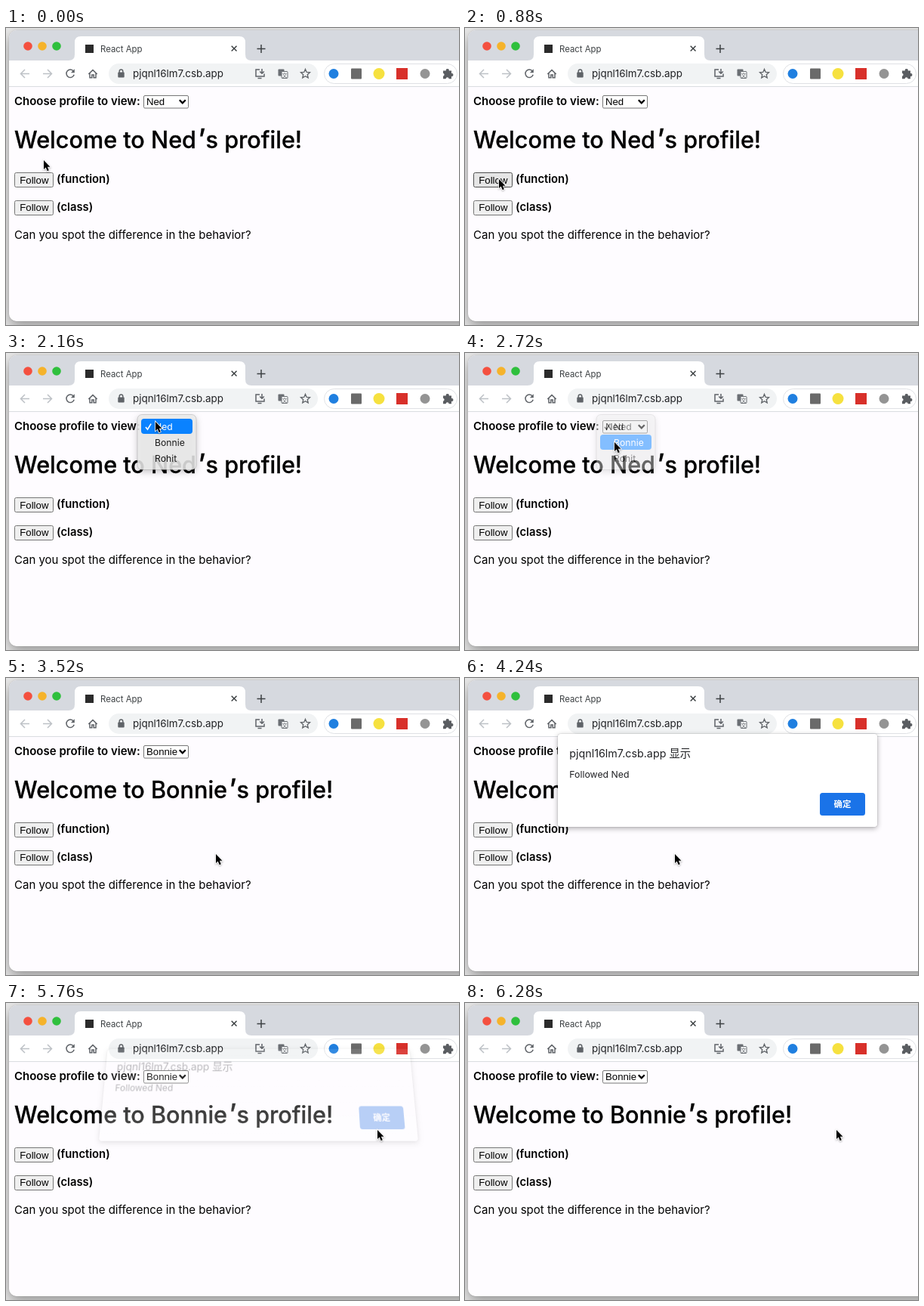
Animation of 600x393 px, one loop 6.44 s. Source, as an HTML page:

```html
<!DOCTYPE html>
<html lang="en">
<head>
<meta charset="utf-8">
<title>Profile demo</title>
<style>
  html, body { margin: 0; width: 100%; height: 100%; overflow: hidden; background: #e9e9e9; }
  #stage { position: relative; width: 600px; height: 393px; overflow: hidden; }
  svg { position: absolute; left: 0; top: 0; display: block; overflow: visible; }
  text { font-family: Inter, "Noto Sans CJK SC", "Noto Sans CJK", sans-serif; white-space: pre; }
  #win { position: absolute; left: 4px; top: 3px; width: 640px; height: 385px; border-radius: 10px;
    background: #fefcff; overflow: hidden; }
  #shade { position: absolute; left: 4px; top: 3px; width: 640px; height: 385px; border-radius: 10px;
    box-shadow: 0 0 1px rgba(0,0,0,.45), 0 7px 18px rgba(0,0,0,.36); }
  #strip { height: 40px; background: #d6d9df; }
  #bar { height: 34px; background: #fff; border-bottom: 1px solid #dadce0; }
  .form text, text.form { font-family: "Liberation Sans", Arial, sans-serif; font-size: 13.2px; }
  .line { fill: none; stroke: #5f6368; stroke-width: 1.5; }
  .dim { stroke: #bdc1c6; }
  .btn rect { fill: #efefef; stroke: #767676; }
  .btn.over rect { fill: #e5e5e5; stroke: #4f4f4f; }
  .btn.down rect { fill: #f5f5f5; stroke: #8d8d8d; }
  #menu text { font-size: 12.2px; }
  #dialog { position: absolute; left: 123px; top: 74px; width: 423px; height: 123px;
    border-radius: 4px; transform-origin: 50% 100%;
    box-shadow: 0 0 1px rgba(0,0,0,.5), 0 2px 7px rgba(0,0,0,.32); }
</style>
</head>
<body>
<div id="stage">
  <div id="shade"></div>
  <div id="win"><div id="strip"></div><div id="bar"></div></div>

  <svg width="600" height="393">
    <circle cx="29" cy="24" r="5.8" fill="#f4503f"/>
    <circle cx="48" cy="24" r="5.8" fill="#f5b32b"/>
    <circle cx="67" cy="24" r="5.8" fill="#2fc03d"/>
    <path d="M83 43q8 0 8-8V19q0-8 8-8H309q8 0 8 8V35q0 8 8 8z" fill="#fff"/>
    <rect x="105" y="22" width="11" height="11" fill="#2b2b2b"/>
    <text x="125" y="31.5" font-size="11.4" fill="#3c4043">React App</text>
    <path class="line" d="M298.7 23.7l6.8 6.8m0-6.8l-6.8 6.8" style="stroke:#3c4043"/>
    <path class="line" d="M332.5 27.5h11m-5.5-5.5v11" style="stroke:#3c4043"/>

    <path class="line dim" d="M31 60.5H19.5m5.5-5.5l-5.5 5.5 5.5 5.5"/>
    <path class="line dim" d="M49 60.5h11.5m-5.5-5.5l5.5 5.5-5.5 5.5"/>
    <path class="line" d="M89.4 57.2a5.2 5.2 0 1 0 .8 4.6"/>
    <path d="M90.8 54.3v5h-5z" fill="#5f6368"/>
    <path class="line" d="M109.3 61l5.7-5.4 5.7 5.4m-9.7-1.2v6h2.8v-3.8h2.4v3.8h2.8v-6"/>

    <rect x="136" y="47" width="277" height="27" rx="13.5" fill="#f1f3f4"/>
    <rect x="148.3" y="58.5" width="8.4" height="7" rx="1" fill="#5f6368"/>
    <path class="line" d="M150.2 59v-1.7a2.3 2.3 0 0 1 4.6 0V59"/>
    <text x="168" y="65.2" font-size="13.4" fill="#202124">pjqnl16lm7.csb.app</text>
    <path class="line" d="M336 55h-5v9h11v-3.5m-8.5 6h5M339 54v6m-2.8-2.5l2.8 2.8 2.8-2.8"/>
    <rect x="360.5" y="54.5" width="8" height="9" rx="1" fill="#6b6f74"/>
    <rect x="365" y="57.5" width="8" height="9" rx="1" fill="#f1f3f4" stroke="#6b6f74"/>
    <text x="365.8" y="65" font-size="6.6" fill="#5f6368">文</text>
    <path id="star" class="line" style="stroke-width:1.3"/>

    <rect x="421.5" y="47.5" width="176" height="26" rx="13" fill="#fff" stroke="#dfe1e5"/>
    <circle cx="434" cy="60.5" r="6.5" fill="#1f7fe0"/>
    <rect x="457" y="53.5" width="14" height="14" rx="1" fill="#6a6a6a"/>
    <circle cx="494" cy="60.5" r="7.5" fill="#f6e13f"/>
    <rect x="517" y="53" width="15" height="15" fill="#d8302a"/>
    <circle cx="555" cy="60.5" r="6.5" fill="#949494"/>
    <path d="M579 56.5h3.8a2 2 0 1 1 3.9 0h3.3v3.6a2 2 0 1 1 0 3.9v3.3h-3.4a2 2 0 0 0-4 0H579v-3.6a2 2 0 0 0 0-3.9z" fill="#5a5d61"/>

    <text x="11" y="102" font-size="15" font-weight="600">Choose profile to view:</text>
    <rect x="182.5" y="89.5" width="59" height="16.5" rx="1.5" fill="#fff" stroke="#767676"/>
    <text class="form" id="choice" x="186" y="102.2"></text>
    <path d="M229.8 95.3l4 4 4-4" fill="none" stroke="#000" stroke-width="2.3"/>
    <text x="11" y="158.5" font-size="30.6" font-weight="500" stroke="#000" stroke-width=".3"
      ><tspan id="title"></tspan><tspan dx="2.5" font-size="36">’</tspan><tspan>s profile!</tspan></text>
    <g class="btn form" id="follow">
      <rect x="11.5" y="191.5" width="51" height="19" rx="2"/><text x="18.3" y="205.5">Follow</text>
    </g>
    <text x="67" y="205.2" font-size="14.8" font-weight="600">(function)</text>
    <g class="btn form">
      <rect x="11.5" y="228.5" width="51" height="19" rx="2"/><text x="18.3" y="242.3">Follow</text>
    </g>
    <text x="67" y="242" font-size="14.8" font-weight="600">(class)</text>
    <text x="11" y="279" font-size="15">Can you spot the difference in the behavior?</text>
  </svg>

  <svg id="menu" width="600" height="393">
    <rect x="174" y="81.5" width="78" height="73" rx="6" fill="#ececec" fill-opacity=".86"
      stroke="#000" stroke-opacity=".14" style="filter:drop-shadow(0 3px 4px rgba(0,0,0,.25))"/>
    <rect id="mark" x="179" width="68" height="20" rx="4" fill="#0a82ff"/>
    <path id="tick" d="M185 98l2.5 3.2 4.6-7.6" fill="none" stroke-width="1.6"/>
    <g id="items"></g>
  </svg>

  <div id="dialog">
    <svg width="423" height="123" lang="zh-CN">
      <text x="15.3" y="30.5" font-size="14.3" fill="#202124">pjqnl16lm7.csb.app 显示</text>
      <text x="15.3" y="58" font-size="12.3" fill="#202124">Followed Ned</text>
      <rect id="ok" x="347" y="78" width="60" height="30" rx="3.5"/>
      <text x="377" y="97.2" font-size="11.4" font-weight="700" fill="#fff" text-anchor="middle">确定</text>
    </svg>
  </div>

  <svg id="cursor" width="14" height="20">
    <path d="M0 0V12L2.7 9.5 4.7 14.2 6.8 13.3 4.9 8.7H8.5z" fill="#000" stroke="#fff" stroke-width="1.6"
      paint-order="stroke" style="filter:drop-shadow(0 1px 1px rgba(0,0,0,.3))"/>
  </svg>
</div>

<script>
const LOOP = 6440, STEP = 40;
const NAMES = ["Ned", "Bonnie", "Rohit"];
const $ = id => document.getElementById(id);
const clamp = v => Math.max(0, Math.min(1, v));
const ramp = (t, a, b) => clamp((t - a) / (b - a));
const ease = p => p * p * (3 - 2 * p);

// Pointer moves: start, end, destination
const HOME = [50, 175];
const MOVES = [
  [200, 560, 45, 200],
  [1120, 1560, 198, 91],
  [2160, 2440, 198, 118],
  [2880, 3240, 278, 233],
  [4640, 4960, 483, 173],
  [5160, 5480, 492, 168]
];

function pointer(t) {
  let [x, y] = HOME;
  for (const [a, b, tx, ty] of MOVES) {
    const p = ease(ramp(t, a, b));
    x += (tx - x) * p;
    y += (ty - y) * p;
  }
  return [x, y];
}

const within = (x, y, l, t, r, b) => x >= l && x <= r && y >= t && y <= b;

const rows = NAMES.map((name, i) => {
  const el = document.createElementNS("http://www.w3.org/2000/svg", "text");
  el.setAttribute("x", 197);
  el.setAttribute("y", 101.8 + i * 21);
  el.textContent = name;
  $("items").append(el);
  return el;
});

let star = "";
for (let i = 0; i < 10; i++) {
  const a = (i / 5 - 0.5) * Math.PI, r = i % 2 ? 2.9 : 6.3;
  star += (i ? "L" : "M") + (396.5 + r * Math.cos(a)).toFixed(2) + " " + (60.8 + r * Math.sin(a)).toFixed(2);
}
$("star").setAttribute("d", star + "z");

function drawDialog(open) {
  const away = 1 - open;
  const box = $("dialog").style;
  box.opacity = open ** 0.85;
  // The top edge turns away and thins out first
  box.background = `linear-gradient(rgba(255,255,255,${open}), #fff)`;
  box.transform = away
    ? `translateY(${-19 * away}px) perspective(400px) rotateX(${13.7 * away}deg) scaleY(${1 + 0.09 * away})`
    : "none";
}

function draw(t) {
  const [x, y] = pointer(t);
  $("cursor").style.transform = `translate(${x}px, ${y}px)`;

  const over = within(x, y, 11, 191, 63, 211);
  const down = over && t >= 600 && t < 720;
  $("follow").setAttribute("class", "btn form" + (down ? " down" : over ? " over" : ""));

  const name = NAMES[t < 2760 ? 0 : 1];
  $("choice").textContent = name;
  $("title").textContent = `Welcome to ${name}`;

  $("menu").style.opacity = t < 1840 ? 0 : 1 - ramp(t, 2640, 2800);
  const row = y > 107.5 ? 1 : 0;
  $("mark").setAttribute("y", 87 + row * 21);
  rows.forEach((el, i) => el.setAttribute("fill", i === row ? "#fff" : "#1a1a1a"));
  $("tick").setAttribute("stroke", row ? "#1a1a1a" : "#fff");

  drawDialog(t < 5000 ? ease(ramp(t, 3680, 3880)) : 1 - ramp(t, 5640, 5800));
  $("ok").setAttribute("fill", within(x, y, 470, 152, 530, 182) ? "#1a66e0" : "#1a73e8");
}

const start = performance.now();
function tick() {
  const t = (performance.now() - start) % LOOP;
  draw(Math.floor(t / STEP) * STEP);
  requestAnimationFrame(tick);
}
draw(0);
requestAnimationFrame(tick);
</script>
</body>
</html>
```
